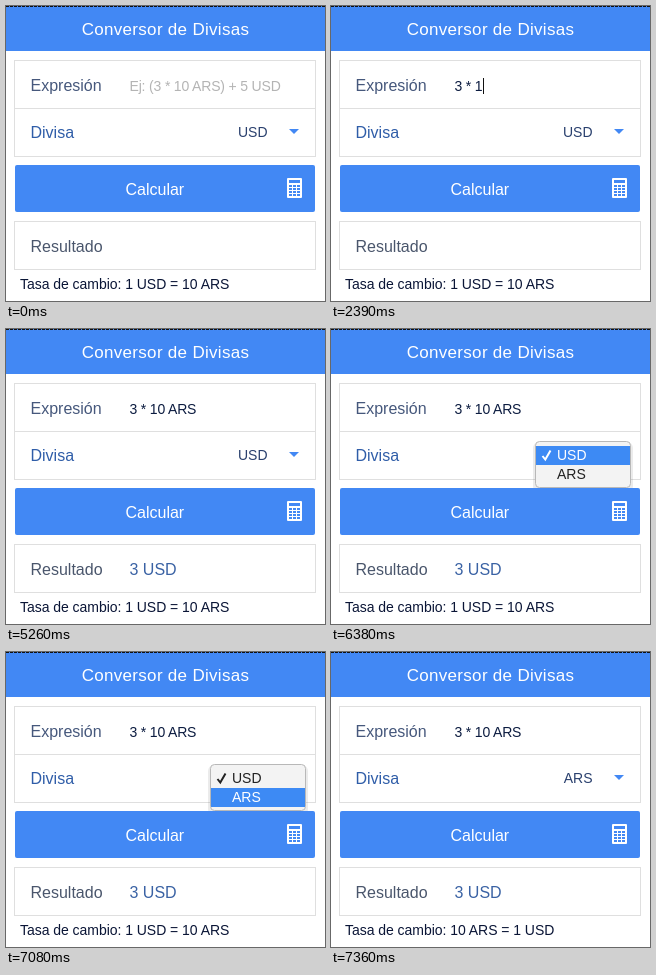
An HTML page that plays this animation: 319x295 px, repeating every 8 s.

```html
<!DOCTYPE html>
<html lang="es">
<head>
<meta charset="utf-8">
<title>Conversor de Divisas</title>
<style>
  html, body { margin: 0; width: 100%; height: 100%; overflow: hidden; background: #fff; }
  svg { display: block; font: 14px "Liberation Sans", Arial, sans-serif; }
  text { white-space: pre; }
  .blue { fill: #4288f4; }
  .card { fill: #fff; stroke: #dfdfdf; }
  .big { font-size: 16px; }
  .tight { letter-spacing: -.17px; }
</style>
</head>
<body>
<svg width="319" height="295" viewBox="0 0 319 295">
  <clipPath id="menuArea"><rect x="201" y="111" width="102" height="48"/></clipPath>

  <rect class="blue" width="319" height="45"/>
  <path d="M0 .5H319" stroke="#111" stroke-dasharray="3 1"/>
  <text x="159.5" y="29" text-anchor="middle" fill="#fff" font-size="17" letter-spacing=".3">Conversor de Divisas</text>

  <rect class="card" x="8.5" y="54.5" width="301" height="96"/>
  <path d="M9 102.5H309" stroke="#dfdfdf"/>
  <text class="big" x="24.5" y="85" fill="#46587c">Expresión</text>
  <text class="tight" id="hint" x="123.5" y="85" fill="#b4b4b4">Ej: (3 * 10 ARS) + 5 USD</text>
  <text class="tight" id="typed" x="123.5" y="85" fill="#0c1c40"></text>
  <rect id="caret" y="72" width="1" height="16" fill="#111"/>

  <text class="big" x="24.5" y="132" fill="#2f5da8">Divisa</text>
  <text id="currency" x="261.5" y="131" text-anchor="end" fill="#2a406e"></text>
  <path class="blue" d="M283 123h10l-5 5z"/>

  <rect class="blue" x="9" y="159" width="300" height="47" rx="2"/>
  <g id="buttonFace">
    <text class="big" x="119.5" y="189" fill="#fff">Calcular</text>
    <rect x="281" y="172" width="15" height="20" rx="1" fill="#fff"/>
    <rect class="blue" x="283" y="174" width="11" height="3"/>
    <g id="keys"></g>
  </g>

  <rect class="card" x="8.5" y="215.5" width="301" height="48"/>
  <text class="big" x="24.5" y="246" fill="#4a566c">Resultado</text>
  <text class="big" id="result" x="123.5" y="246" fill="#3a62a4">3 USD</text>
  <text id="rate" x="14" y="283" fill="#0a1536" letter-spacing="-.04"></text>

  <g id="menu" clip-path="url(#menuArea)">
    <rect x="202" y="113" width="100" height="50" rx="6" fill="#000" opacity=".08"/>
    <rect x="204.5" y="112.5" width="95" height="46" rx="4" fill="#f3f3f3" stroke="#b8b8b8"/>
    <rect id="highlight" x="205" width="94" height="19" fill="#3d8af4"/>
    <path id="check" d="M211.5 127l2.8 3.5L219.5 121.5" fill="none" stroke-width="2"/>
    <text id="optionUSD" x="226" y="131">USD</text>
    <text id="optionARS" x="226" y="150">ARS</text>
  </g>
</svg>
<script>
const $ = id => document.getElementById(id);
const show = (id, on) => $(id).style.display = on ? '' : 'none';
const setText = (id, value) => { if ($(id).textContent !== value) $(id).textContent = value; };

const expression = '3 * 10 ARS';
const keyTimes = [1130, 1340, 1830, 1970, 2390, 2600, 2740, 2950, 3090, 3230];
const caretStops = [124, 132, 136, 141, 144, 152, 160, 164, 173, 183, 192];

for (let i = 0; i < 12; i++) {
  const key = document.createElementNS('http://www.w3.org/2000/svg', 'rect');
  const attrs = { class: 'blue', x: 283 + i % 3 * 4, y: 179 + Math.floor(i / 3) * 3, width: 3, height: 2 };
  for (const name in attrs) key.setAttribute(name, attrs[name]);
  $('keys').append(key);
}

function draw(t) {
  const within = (from, to) => t >= from && t < to;

  const count = keyTimes.filter(time => t >= time).length;
  setText('typed', expression.slice(0, count));
  show('hint', count === 0);
  $('caret').setAttribute('x', caretStops[count]);
  show('caret', within(500, 990) || within(1130, 3720) || within(4280, 4770));

  $('buttonFace').setAttribute('opacity', within(5050, 5260) ? .92 : 1);
  show('result', t >= 5050);
  setText('currency', t < 7220 ? 'USD' : 'ARS');
  setText('rate', 'Tasa de cambio: ' + (t < 7290 ? '1 USD = 10 ARS' : '10 ARS = 1 USD'));

  // The chosen row blinks once, then the menu fades in short steps.
  show('menu', within(6380, 7360));
  $('menu').setAttribute('opacity', t < 7150 ? 1 : t < 7220 ? .75 : t < 7290 ? .45 : .15);
  const active = t < 6660 ? 'USD' : within(7010, 7080) ? '' : 'ARS';
  const ink = name => active === name ? '#fff' : '#222';
  show('highlight', active);
  $('highlight').setAttribute('y', active === 'USD' ? 117 : 136);
  $('check').setAttribute('stroke', ink('USD'));
  $('optionUSD').setAttribute('fill', ink('USD'));
  $('optionARS').setAttribute('fill', ink('ARS'));
}

const start = performance.now();
function tick() {
  draw((performance.now() - start) % 8000);
  requestAnimationFrame(tick);
}
tick();
</script>
</body>
</html>
```
